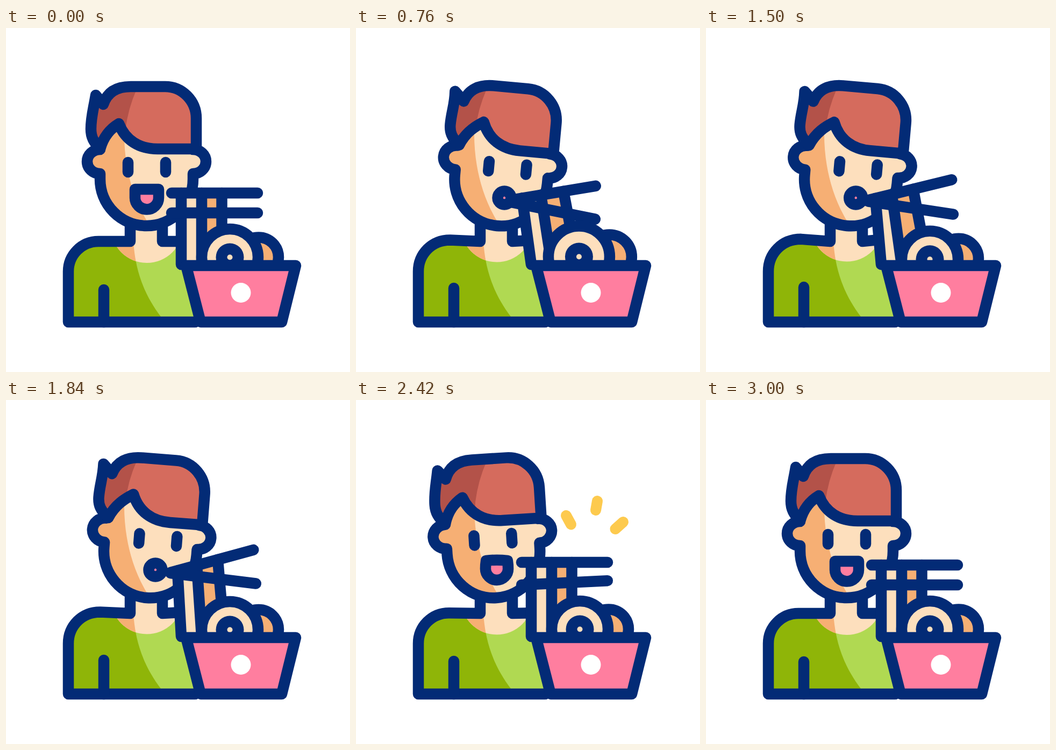
An HTML page that plays this animation: 640 px wide and 640 px high, repeating every 3100 ms.

```html
<!DOCTYPE html>
<html lang="en">
<head>
<meta charset="utf-8">
<title>Eating noodles</title>
<style>
  html, body { margin: 0; width: 100%; height: 100%; overflow: hidden; background: #fff; }
  svg { display: block; width: 100vw; height: 100vh; }
  .line { fill: none; stroke: #032b76; stroke-width: 20.5; stroke-linecap: round; stroke-linejoin: round; }
  .ink { fill: #032b76; }
  .skin { fill: #fddfbd; }
  .tan { fill: #f6af74; }
  .pink { fill: #ff7e9f; }
  .spark { fill: none; stroke: #fdca4e; stroke-width: 20; stroke-linecap: round; }
</style>
</head>
<body>
<svg viewBox="0 0 640 640">
  <defs>
    <path id="torso"/>
    <circle id="collar" cx="262" r="67"/>
    <path id="face" d="M210 178L175 226A24 22.5 0 0 0 175 271V281A86.5 87 0 0 0 348 281V271A24 22.5 0 0 0 348 226L340 178Z"/>
    <path id="hair"/>
    <path id="bodyShade" d="M0 340H237V395C240 455 260 500 288 537L300 560H0Z"/>
    <clipPath id="torsoClip"><use href="#torso"/></clipPath>
    <clipPath id="collarClip"><use href="#collar"/></clipPath>
    <clipPath id="faceClip"><use href="#face"/></clipPath>
    <clipPath id="hairClip"><use href="#hair"/></clipPath>
  </defs>

  <!-- body -->
  <rect class="skin" x="231" y="340" width="60" height="62"/>
  <g clip-path="url(#torsoClip)">
    <rect width="640" height="640" fill="#b0d952"/>
    <use href="#bodyShade" fill="#8fb508"/>
    <g clip-path="url(#collarClip)">
      <rect class="skin" width="640" height="640"/>
      <use href="#bodyShade" class="tan"/>
    </g>
  </g>
  <path class="line" id="torsoLine"/>
  <path class="line" id="arm"/>

  <!-- head: the shading stays put while its clip moves -->
  <g clip-path="url(#faceClip)">
    <rect class="skin" width="640" height="640"/>
    <path class="tan" d="M0 100H221L220 190C219 250 232 310 264 362V400H0Z"/>
  </g>
  <g clip-path="url(#hairClip)">
    <rect width="640" height="640" fill="#d56b5d"/>
    <path fill="#b35249" d="M0 90H251L243 114Q227 150 222 190L220 240H0Z"/>
  </g>
  <g id="headLines">
    <path class="line" d="M175 226A24 22.5 0 0 0 175 271V281A86.5 87 0 0 0 348 281V271A24 22.5 0 0 0 348 226"/>
    <path class="line" id="hairLine"/>
    <path class="line" id="eyes" d="M227 250V268M297 250V268"/>
  </g>

  <!-- noodles and chopsticks -->
  <path class="skin" id="noodleA"/>
  <path class="tan" id="noodleB"/>
  <path class="line" id="strands"/>
  <path class="line" id="sticks"/>
  <path class="line pink" id="mouth"/>

  <!-- bowl -->
  <circle class="line tan" id="rollBack"/>
  <circle class="line skin" id="roll"/>
  <circle class="ink" id="rollCore" r="26"/>
  <circle class="skin" id="rollDot" r="5"/>
  <path class="line pink" d="M335 442H539L513 547H362Z"/>
  <circle cx="437" cy="492.5" r="18.5" fill="#fff"/>

  <path class="spark"/>
  <path class="spark"/>
  <path class="spark"/>
</svg>
<script>
const LOOP = 3100;
const TIMES = [0, 440, 760, 1180, 1840, 2420, 3000];

// One value per time; the last pose equals the first.
const KEYS = {
  lean:    [0, 4.6, 5.3, 5.3, 4.45, -3.6],
  turn:    [0, 7, 9.5, 10, 12, 0],
  breath:  [0, 7, 3, 6, 3, 1],
  mouthX:  [262, 274, 276, 279, 278, 262],
  mouthY:  [317, 317, 316, 316, 316, 315],
  pucker:  [0, .1, 1, 1, 1, .3],
  gape:    [1, 1.18, 1, 1, 1, 1.1],
  stickX:  [308, 289, 288, 296, 306, 308],
  upperY:  [307, 318, 320, 319.5, 321, 302],
  upperA:  [0, -6.9, -9.4, -11.4, -15.3, 0],
  lowerY:  [344, 326, 324, 323.5, 322, 344],
  lowerA:  [0, 11.3, 11.4, 9.7, 7, -2.8],
  strand1: [326, 310, 309, 312, 319, 326],
  strand2: [364, 344, 344, 340, 355, 364],
  strand3: [401.5, 386, 386, 380, 394, 401.5],
  rollY:   [0, 7, -1, 6, 1, 0],
  rollR:   [0, 0, 4.5, 0, 0, 0]
};
const SPARKS = [[391, 215, 400, 231.5], [449, 188, 446, 205], [497, 227, 482.5, 240]];

const $ = id => document.getElementById(id);
const set = (id, attrs) => { for (const k in attrs) $(id).setAttribute(k, attrs[k]); };
const rad = deg => deg * Math.PI / 180;
const mix = (a, b, k) => a + (b - a) * k;
const ramp = (t, a, b) => {
  const k = Math.min(1, Math.max(0, (t - a) / (b - a)));
  return k * k * (3 - 2 * k);
};

// Smooth curve through the keys that never overshoots them.
function track(keys) {
  const v = [...keys, keys[0]], n = v.length - 1;
  const slope = i => (v[i + 1] - v[i]) / (TIMES[i + 1] - TIMES[i]);
  const m = v.map((_, i) => {
    if (!i || i === n) return 0;
    const a = slope(i - 1), b = slope(i);
    return a * b > 0 ? 2 * a * b / (a + b) : 0;
  });
  return t => {
    if (t >= TIMES[n]) return v[n];
    let i = 0;
    while (t >= TIMES[i + 1]) i++;
    const h = TIMES[i + 1] - TIMES[i], s = (t - TIMES[i]) / h, r = 1 - s;
    return v[i] * (1 + 2 * s) * r * r + m[i] * h * s * r * r
      + v[i + 1] * s * s * (3 - 2 * s) - m[i + 1] * h * s * s * r;
  };
}
const tracks = Object.entries(KEYS).map(([name, keys]) => [name, track(keys)]);

function drawBody(b) {
  const y = 397 - b * .85, right = 397 - b * .7;
  const shoulder = `L${172 + b} ${y}C141 ${y} 116 ${422 - b / 2} 116 453V547H352`;
  set('torso', { d: `M330 ${right}L291 397H231${shoulder}L330 442Z` });
  set('torsoLine', { d: `M231 350V397${shoulder}M291 350V397L326 ${right}` });
  set('arm', { d: `M182 547V${487 - b}` });
  set('collar', { cy: 370 - b / 2 });
}

function drawHead(p) {
  const k = p.turn, transform = `rotate(${p.lean} 262 372)`;
  const lag = Math.max(0, p.lean);
  const d = `M354 225V168A58 59 0 0 0 296 109H232C205 109 ${188 - lag * .4} 120 ${181 - lag * .4} ${142 + lag * .2}`
    + `L${167 - lag * 1.1} ${125 + lag * .2}C163 150 158 165 158 188C158 203 163 212 ${175 + k * .3} 225`
    + `C${182 + k * .6} 200 ${195 + k} 187 ${210 + k} 178C${222 + k} 209 ${248 + k} 225 ${282 + k} 225Z`;
  set('hair', { d, transform });
  set('hairLine', { d });
  set('face', { transform });
  set('headLines', { transform });
  set('eyes', { transform: `translate(${k})` });
}

// Blend from a flat-topped open mouth to a small circle.
function drawMouth(p) {
  const at = (open, round) => mix(open, round * 12.5, p.pucker) * p.gape;
  const topX = at(22, .707), topY = at(-17, -.707);
  const archX = at(8, .317), archY = at(-17, -1.097);
  const upX = at(22, .894), upY = at(-12, -.52);
  const side = at(22, 1), sideY = at(-1, 0), aboveY = at(-6, -.265);
  const lowY = at(10.6, .552), baseX = at(12, .552), base = at(20.5, 1);
  set('mouth', {
    d: `M${-topX} ${topY}C${-archX} ${archY} ${archX} ${archY} ${topX} ${topY}`
      + `C${upX} ${upY} ${side} ${aboveY} ${side} ${sideY}`
      + `C${side} ${lowY} ${baseX} ${base} 0 ${base}`
      + `C${-baseX} ${base} ${-side} ${lowY} ${-side} ${sideY}`
      + `C${-side} ${aboveY} ${-upX} ${upY} ${-topX} ${topY}Z`,
    transform: `translate(${p.mouthX} ${p.mouthY}) rotate(${Math.max(0, p.lean) * (1 - p.pucker)})`
  });
}

function drawNoodles(p) {
  const stick = (y, a) =>
    `M${p.stickX} ${y}l${160 * Math.cos(rad(a))} ${160 * Math.sin(rad(a))}`;
  set('sticks', { d: stick(p.upperY, p.upperA) + stick(p.lowerY, p.lowerA) });

  const tan = Math.tan(rad(p.upperA));
  const [l, m, r] = [[p.strand1, '326 440'], [p.strand2, '364 440'], [p.strand3, '401.5 385']]
    .map(([x, foot]) => ({ top: `${x} ${p.upperY + (x - p.stickX) * tan}`, foot }));
  const band = (a, b) => `M${a.top}L${b.top}L${b.foot}L${a.foot}Z`;
  set('noodleA', { d: band(l, m) });
  set('noodleB', { d: band(m, r) });
  set('strands', { d: [l, m, r].map(s => `M${s.top}L${s.foot}`).join('') });

  const cx = 416.5 - p.rollR * .35, cy = 426.5 + p.rollY;
  set('rollBack', { cx: 470 + p.rollR * .3, cy: 426.5 + p.rollY * .6, r: 37 + p.rollR });
  set('roll', { cx, cy, r: 52.5 + p.rollR });
  set('rollCore', { cx, cy });
  set('rollDot', { cx, cy });
}

// Each spark grows outward, rests, then shrinks away at its outer end.
function drawSparks(t) {
  const grow = ramp(t, 2180, 2400), fade = ramp(t, 2460, 2700);
  document.querySelectorAll('.spark').forEach((el, i) => {
    const [x1, y1, x2, y2] = SPARKS[i];
    const at = k => `${mix(x2, x1, k)} ${mix(y2, y1, k)}`;
    el.setAttribute('d', `M${at(fade)}L${at(grow)}`);
    el.style.strokeWidth = 20 * Math.min(1, grow * 2, (1 - fade) * 2);
    el.style.display = grow > 0 && fade < 1 ? '' : 'none';
  });
}

function draw(t) {
  const p = {};
  for (const [name, at] of tracks) p[name] = at(t);
  drawBody(p.breath);
  drawHead(p);
  drawMouth(p);
  drawNoodles(p);
  drawSparks(t);
}

// Class fills must win over the outline's empty fill.
const start = performance.now();
function tick() {
  draw((performance.now() - start) % LOOP);
  requestAnimationFrame(tick);
}
tick();
</script>
</body>
</html>
```
